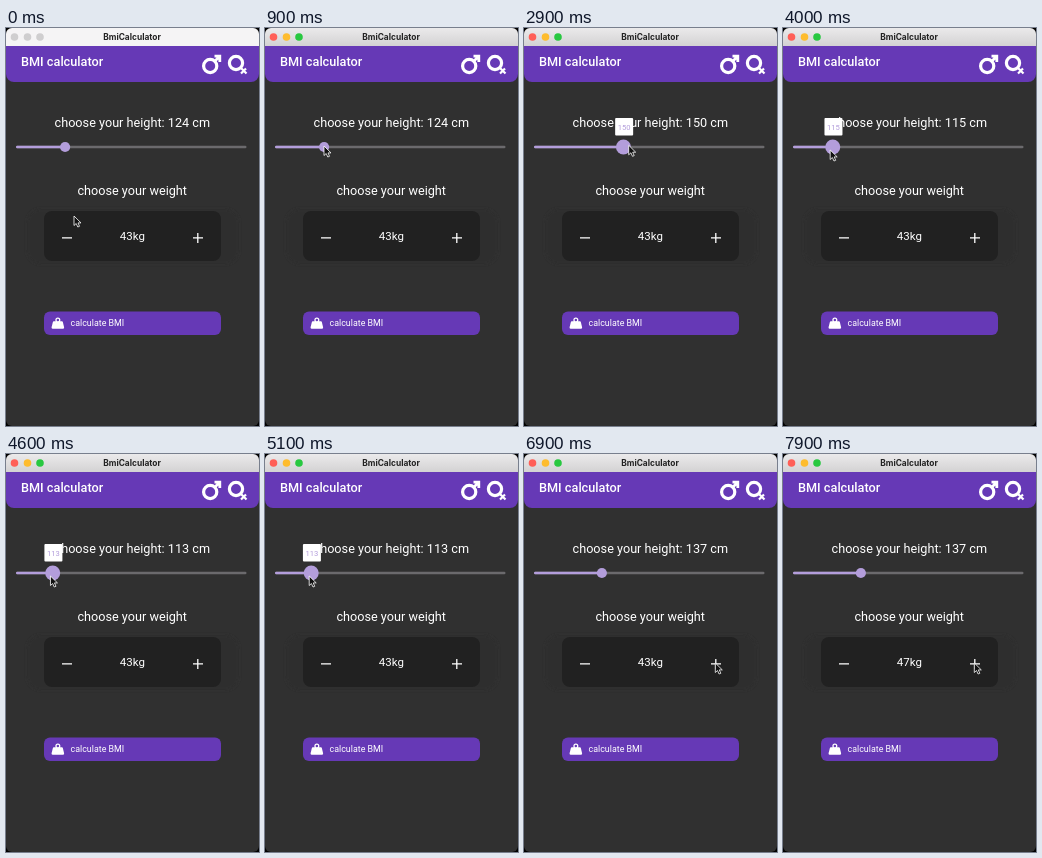
Animation of 253 by 398 pixels, one loop 8 s. Source, as an HTML page:

```html
<!DOCTYPE html>
<html lang="en">
<head>
<meta charset="utf-8">
<title>BmiCalculator</title>
<style>
  html, body { margin: 0; width: 100%; height: 100%; overflow: hidden; background: #000; }
  svg { display: block; width: 253px; height: 398px; font-family: Roboto, "Open Sans", sans-serif; }
  text { fill: #fff; }
  .mid { text-anchor: middle; }
  .line { fill: none; stroke: #fff; }
  .purple { fill: #6639b6; }
  .lilac { fill: #b39ddb; }
  .bar { fill: #f5f4f5; }
  .lights circle { fill: #cfcecf; }
  .active .bar { fill: url(#metal); }
  .active .red { fill: #ff5f57; }
  .active .yellow { fill: #febc2e; }
  .active .green { fill: #28c840; }
</style>
</head>
<body>
<svg id="app" viewBox="0 0 253 398">
  <defs>
    <clipPath id="window"><rect width="253" height="398" rx="6"/></clipPath>
    <linearGradient id="metal" x2="0" y2="1">
      <stop stop-color="#ebeaeb"/><stop offset="1" stop-color="#d3d2d3"/>
    </linearGradient>
    <filter id="soft"><feGaussianBlur stdDeviation="1.5"/></filter>
  </defs>
  <g clip-path="url(#window)">
    <rect width="253" height="398" fill="#303030"/>
    <path class="purple" d="M0 17H253V46a8 8 0 0 1-8 8H8a8 8 0 0 1-8-8Z"/>
    <rect class="bar" width="253" height="18"/>
    <g class="lights">
      <circle class="red" cx="8.5" cy="9" r="3.8"/>
      <circle class="yellow" cx="21.5" cy="9" r="3.8"/>
      <circle class="green" cx="34" cy="9" r="3.8"/>
    </g>
    <text class="mid" x="126" y="12" font-family="Inter, sans-serif" font-weight="700" font-size="8.4" style="fill:#222">BmiCalculator</text>

    <text x="15" y="38" font-size="12.7" font-weight="500">BMI calculator</text>
    <g class="line" stroke-width="3.2">
      <circle cx="204.2" cy="38" r="6.6"/>
      <path d="M208.5 28.2H213.8V34M209 33L213.5 28.5" stroke-width="2.8"/>
      <circle cx="230" cy="35" r="6.6"/>
      <path d="M234.5 39.5L240.5 45.5M240 40.5L235 45.5" stroke-width="2.2"/>
    </g>

    <text id="height" class="mid" x="126.3" y="98.6" font-size="12.68"></text>
    <rect x="10" y="117.7" width="230.5" height="2.6" rx="1.3" fill="#6b6a6d"/>
    <rect id="track" class="lilac" x="10" y="117.7" height="2.6" rx="1.3"/>
    <circle id="thumb" class="lilac" cy="119"/>
    <g id="tip">
      <rect x="-9" y="90" width="18" height="17.6" rx="1" fill="#fff"/>
      <text id="tipText" class="mid" y="101.7" font-size="7.6" style="fill:#b39ddb"></text>
    </g>

    <text class="mid" x="126.2" y="167" font-size="12.68">choose your weight</text>
    <rect x="21" y="181" width="212" height="55" rx="14" fill="#2d2d2d" filter="url(#soft)"/>
    <rect x="38" y="183" width="177" height="50" rx="8" fill="#212121"/>
    <circle id="ripple" cx="192" cy="210" r="12" fill="#fff"/>
    <path class="line" d="M56 209.8H66M187 209.8H197M191.8 205V215" stroke-width="1.3"/>
    <text id="weight" class="mid" x="126.4" y="211.8" font-size="11.5"></text>

    <rect class="purple" x="38" y="283.5" width="177" height="23.5" rx="6"/>
    <path transform="translate(44.3 287.6) scale(.63)" fill="#fff" fill-rule="evenodd"
      d="M12 3a4 4 0 0 1 4 4c0 .7-.2 1.4-.5 2H18c1 0 1.8.7 2 1.6C22 18.6 22 18.8 22 19a2 2 0 0 1-2 2H4a2 2 0 0 1-2-2c0-.2 0-.4 2-8.4C4.2 9.7 5 9 6 9h2.5C8.2 8.4 8 7.7 8 7a4 4 0 0 1 4-4m0 2a2 2 0 0 0 0 4a2 2 0 0 0 0-4Z"/>
    <text x="64.6" y="298.2" font-size="8.9">calculate BMI</text>

    <path id="cursor" d="M0 0V9.5L2.2 7.5L3.8 11L5.5 10.3L4 6.9H7Z" fill="#111" stroke="#fff" stroke-width=".8" stroke-linejoin="round"/>
  </g>
</svg>
<script>
  const LOOP = 8000, STEP = 100, PRESS = 2600, RELEASE = 6200;
  const clamp = p => Math.min(1, Math.max(0, p));
  const easeOut = p => 1 - (1 - p) ** 3;
  const el = id => document.getElementById(id);
  const set = (id, attrs) => {
    for (const name in attrs) el(id).setAttribute(name, attrs[name]);
  };

  // Eased value from a to b between two times
  const move = (t, start, end, a, b, ease = easeOut) => a + (b - a) * ease(clamp((t - start) / (end - start)));
  const delta = (t, start, end, by) => move(t, start, end, 0, by);

  // Drag right, back left, a little further, then right again
  const heightAt = t => 124 + delta(t, 2700, 3200, 33) + delta(t, 3300, 4200, -42)
    + delta(t, 4200, 5100, -2) + delta(t, 5300, 6000, 24);

  const isDragging = t => t >= PRESS && t < RELEASE;
  const thumbAt = t => 10 + (heightAt(t) - 90) * 1.444 + (isDragging(t) ? 3 : 0);

  function cursorAt(t) {
    const glide = p => p * p * (3 - 2 * p);
    if (t < PRESS) {
      const sway = 29 * Math.sin(Math.PI * clamp((t - 1900) / 500));
      return [move(t, 0, 700, 68, 59, glide) - sway, move(t, 0, 700, 188, 118, glide)];
    }
    // The pointer runs one step ahead of the thumb
    if (t < 6100) return [thumbAt(t + STEP) - 2, Math.min(122, 116 + (t - PRESS) / 230)];
    return [move(t, 6100, 6900, 78, 191.3, glide), move(t, 6100, 6900, 122, 209, glide)];
  }

  function draw(now) {
    // The small lead keeps a frame drawn just before a step from lagging behind it
    const t = Math.floor(((now + 20) % LOOP) / STEP) * STEP;
    const dragging = isDragging(t), x = thumbAt(t), cm = Math.round(heightAt(t));
    const clicks = [7200, 7400, 7700, 7900].filter(c => c <= t).length;
    const pressed = (t >= 7200 && t < 7500) || (t >= 7700 && t < 7900);

    el("app").classList.toggle("active", t >= 900);
    el("height").textContent = `choose your height: ${cm} cm`;
    el("tipText").textContent = cm;
    el("weight").textContent = `${43 + clicks}kg`;
    set("track", { width: x - 10 });
    set("thumb", { cx: x, r: dragging ? 7.5 : 5.1 });
    set("tip", { transform: `translate(${x + 0.7})`, opacity: +dragging });
    set("ripple", { opacity: pressed ? 0.06 : 0 });
    set("cursor", { transform: `translate(${cursorAt(t)})` });
    requestAnimationFrame(draw);
  }
  draw(0);
</script>
</body>
</html>
```
